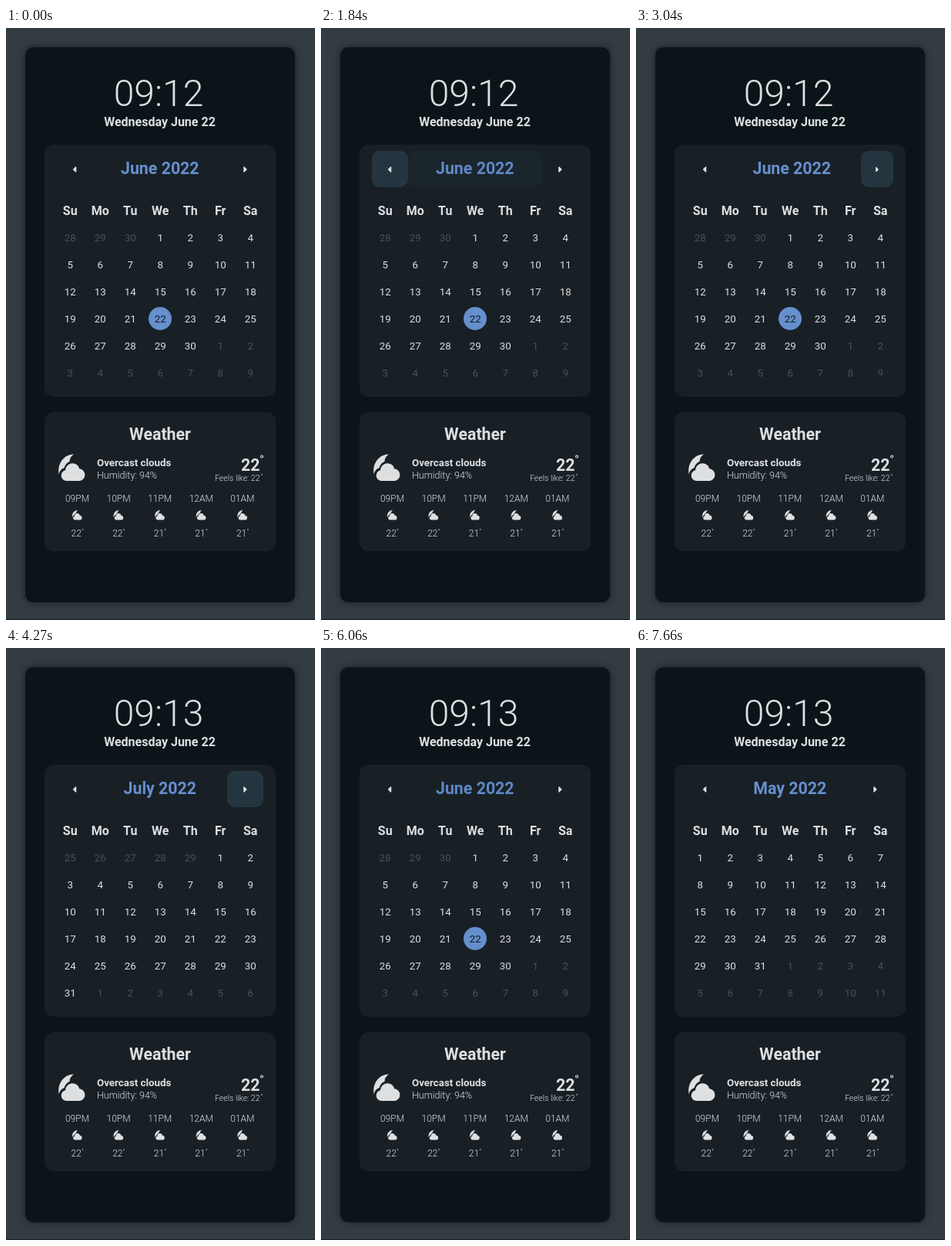
An HTML page that plays this animation: 401 px wide and 766 px high, repeating every 8000 ms.

```html
<!DOCTYPE html>
<html lang="en">
<head>
<meta charset="utf-8">
<title>Calendar and weather panel</title>
<style>
html, body { margin: 0; width: 100%; height: 100%; overflow: hidden; background: #323c41; }
svg { display: block; width: 401px; height: 766px; font-family: Roboto, sans-serif; }
text { fill: #dedfe0; }
.mid { text-anchor: middle; }
.bold { font-weight: 700; }
.light { font-weight: 300; }
.clock { font-size: 48px; }
.h1 { font-size: 21.33px; }
.h2 { font-size: 16px; }
.body { font-size: 13.33px; }
.small { font-size: 12px; }
.other { fill: #4a5054; }
.today { fill: #111b20; }
.card { fill: #182026; }
.icon { fill: #dedfe0; }
.arrow { fill: #dedfe0; stroke: #dedfe0; stroke-width: 1.4; stroke-linejoin: round; }
.ring { fill: none; stroke: #dedfe0; }
.spot { fill: #24353f; }
.shade { filter: drop-shadow(0 0 4px rgba(0, 0, 0, .5)); }
</style>
</head>
<body>
<svg viewBox="0 0 401 766">
  <defs>
    <g id="cloudy" class="icon">
      <path d="M88 551.5C76 551.5 66 563 68.8 577.5C69.2 574 71.5 570.5 75.5 569.2C77 564.5 79.5 562 82.5 561C82.5 557 84.5 554 88 551.5Z"/>
      <path d="M78.5 586a7 7 0 0 1-1.5-13.8 9.3 9.3 0 0 1 18.3-2 8 8 0 0 1 .7 15.8z"/>
    </g>
  </defs>
  <rect y="765" width="401" height="1" fill="#182024"/>
  <rect class="shade" x="25" y="25" width="350" height="718" rx="10" fill="#0b1519"/>
  <text id="clock" class="mid light clock" x="198" y="101"></text>
  <text class="mid bold h2" x="199.5" y="127">Wednesday June 22</text>

  <rect class="card" x="50" y="151" width="300" height="326" rx="12"/>
  <rect id="spotL" class="spot" x="66" y="159" width="47" height="47" rx="10"/>
  <rect id="spotT" class="spot" x="113" y="159" width="174" height="47" rx="10"/>
  <rect id="spotR" class="spot" x="287" y="159" width="47" height="47" rx="10"/>
  <path id="arrowL" class="arrow" d="M1.4-3V3L-1.6 0Z"/>
  <path id="arrowR" class="arrow" d="M-1.4-3V3L1.6 0Z"/>
  <text id="title" class="mid bold h1" y="189"></text>
  <circle id="mark" cx="200" cy="376" r="15" fill="#668fce"/>
  <g id="grid"></g>

  <rect class="card" x="50" y="497" width="300" height="180" rx="12"/>
  <text class="mid bold h1" x="200" y="533">Weather</text>
  <use href="#cloudy"/>
  <text class="bold body" x="118" y="567">Overcast clouds</text>
  <text class="light" x="118" y="583" font-size="12.5">Humidity: 94%</text>
  <text class="bold h1" x="329.5" y="573" text-anchor="end">22</text>
  <circle class="ring" cx="332" cy="554.5" r="1.5" stroke-width="1.1"/>
  <text class="light" x="329.5" y="586" font-size="10.5" text-anchor="end">Feels like: 22</text>
  <circle class="ring" cx="332" cy="578" r=".7" stroke-width=".5"/>
  <g id="hours"></g>
</svg>
<script>
const $ = id => document.getElementById(id);
const NS = 'http://www.w3.org/2000/svg';
const LOOP = 8000, YEAR = 2022;
const MONTHS = { 4: 'May', 5: 'June', 6: 'July', 7: 'August' };

function add(parent, tag, attrs, text = '') {
  const el = document.createElementNS(NS, tag);
  for (const k in attrs) el.setAttribute(k, attrs[k]);
  el.textContent = text;
  return parent.appendChild(el);
}

// Weekday headings and the 6 x 7 grid of days
const colX = c => 83.2 + 39 * c;
['Su', 'Mo', 'Tu', 'We', 'Th', 'Fr', 'Sa'].forEach((d, c) =>
  add($('grid'), 'text', { class: 'mid bold h2', x: colX(c), y: 242 }, d));
const cells = Array.from({ length: 42 }, (_, i) =>
  add($('grid'), 'text', { x: colX(i % 7), y: 276 + 35 * Math.floor(i / 7) }));

// Hourly forecast
[['09PM', 22], ['10PM', 22], ['11PM', 21], ['12AM', 21], ['01AM', 21]].forEach(([hour, temp], i) => {
  const x = 92.5 + 53.6 * i, g = $('hours');
  add(g, 'text', { class: 'mid light small', x, y: 613 }, hour);
  add(g, 'use', { href: '#cloudy', transform: `translate(${x} 630) scale(.375) translate(-86 -568.5)` });
  add(g, 'text', { class: 'mid light small', x: x - 1.3, y: 658 }, temp);
  add(g, 'circle', { class: 'ring', cx: x + 7, cy: 649, r: .7, 'stroke-width': .5 });
});

// Each step lists only what changes: spots L, T, R; press pl, pr; month; dim title; clock
const STEPS = [
  [0, { L: 0, T: 0, R: 0, pl: 0, pr: 0, month: 5, dim: 0, clock: '09:12' }],
  [1010, { R: 1 }],
  [1260, { R: 0, T: 1, dim: 1 }],
  [1840, { L: 1, T: .25 }],
  [2270, { L: 0, T: 1 }],
  [2610, { T: 0, R: 1, dim: 0 }],
  [3040, { pr: .55 }],
  [3110, { pr: .8 }],
  [3160, { pr: 1 }],
  [3410, { R: 0, pr: .2, month: 6 }],
  [3520, { pr: 0 }],
  [3620, { clock: '09:13' }],
  [4270, { R: 1 }],
  [4320, { pr: .55 }],
  [4760, { pr: 1 }],
  [5020, { R: 0, pr: 0, month: 7 }],
  [5410, { T: .5 }],
  [5510, { T: 1 }],
  [5790, { dim: 1 }],
  [6060, { T: 0, month: 5 }],
  [6790, { L: 1 }],
  [7190, { pl: .55, dim: 0 }],
  [7270, { pl: 1 }],
  [7520, { L: 0, pl: .2, month: 4 }],
  [7660, { pl: 0 }]
];
const SHRINK = 9;

function fillMonth(month) {
  const first = new Date(YEAR, month, 1).getDay();
  const count = new Date(YEAR, month + 1, 0).getDate();
  const before = new Date(YEAR, month, 0).getDate() - 1;
  cells.forEach((cell, i) => {
    const day = i - first + 1, inside = day >= 1 && day <= count;
    const today = month === 5 && day === 22;
    cell.textContent = day < 1 ? before + day : inside ? day : day - count;
    cell.setAttribute('class', 'mid body ' + (today ? 'today' : inside ? '' : 'other'));
  });
  $('title').textContent = `${MONTHS[month]} ${YEAR}`;
  $('mark').style.opacity = month === 5 ? 1 : 0;
}

function placeArrow(id, x, press) {
  $(id).setAttribute('transform', `translate(${x} 183) scale(${1 - .25 * press})`);
}

function draw(s) {
  const dl = SHRINK * s.pl, dr = SHRINK * s.pr;
  for (const k of ['L', 'T', 'R']) $('spot' + k).style.opacity = s[k];
  $('spotL').setAttribute('width', 47 - dl);
  $('spotR').setAttribute('x', 287 + dr);
  $('spotR').setAttribute('width', 47 - dr);
  placeArrow('arrowL', 89.2 - dl / 2, s.pl);
  placeArrow('arrowR', 310.3 + dr / 2, s.pr);
  fillMonth(s.month);
  $('title').setAttribute('x', 199.8 + (dr - dl) / 2);
  $('title').style.fill = s.dim ? '#5c88c7' : '#668fce';
  $('clock').textContent = s.clock;
}

let shown = -1;
function tick(now) {
  const t = now % LOOP;
  const n = STEPS.filter(([at]) => at <= t).length;
  if (n !== shown) {
    shown = n;
    draw(Object.assign({}, ...STEPS.slice(0, n).map(step => step[1])));
  }
  requestAnimationFrame(() => tick(performance.now() - start));
}
const start = performance.now();
tick(0);
</script>
</body>
</html>
```
